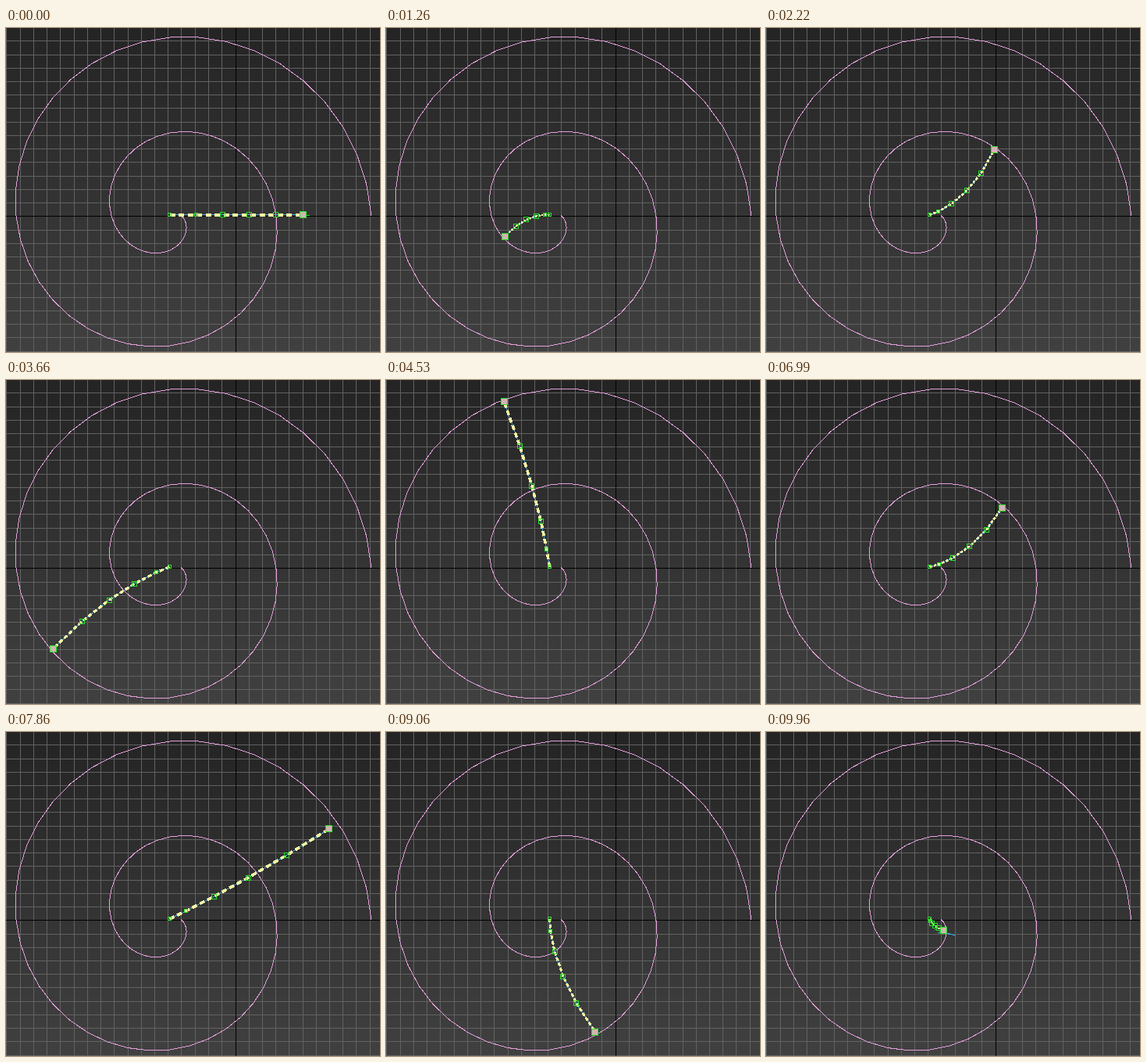
Animation, 479 px wide and 414 px high, one loop 9990 ms. Source, as an HTML page:

```html
<!DOCTYPE html>
<html lang="en">
<head>
<meta charset="utf-8">
<title>Bone chain on a spiral</title>
<style>
html, body { margin: 0; width: 100%; height: 100%; overflow: hidden; background: #303030; }
svg { display: block; width: 100vw; height: 100vh; }
</style>
</head>
<body>
<svg viewBox="0 0 479 414" shape-rendering="crispEdges" fill="none">
  <defs>
    <linearGradient id="shade" x2="0" y2="1">
      <stop stop-color="#242424"/><stop offset="1" stop-color="#404040"/>
    </linearGradient>
  </defs>
  <rect width="479" height="414" fill="url(#shade)"/>
  <path id="grid" stroke="#626262"/>
  <path d="M0 240.5H479M294.5 0V414" stroke="#000"/>
  <path id="spiral" stroke="#e69fdc" transform="translate(.4 .6)"/>
  <g id="chain"></g>
</svg>
<script>
const LOOP = 9990, CX = 209.5, CY = 238.9, CELL = 17.23, BONES = 5;
const $ = id => document.getElementById(id);
const clamp = (v, lo, hi) => Math.max(lo, Math.min(hi, v));
const polar = (r, deg) => {
  const a = deg * Math.PI / 180;
  return [CX + r * Math.cos(a), CY + r * Math.sin(a)];
};
const radius = deg => 14 + 122 * deg / 360;

let grid = '';
for (let k = -17; k < 12; k++) {
  if (!k) continue;
  const x = Math.round(293.38 + k * CELL) + 0.5, y = Math.round(240.28 + k * CELL) + 0.5;
  grid += `M${x} 0V414M0 ${y}H479`;
}
$('grid').setAttribute('d', grid);

const curve = [];
for (let deg = 0; deg <= 720; deg += 9) curve.push(polar(radius(deg), deg));
$('spiral').setAttribute('d', 'M' + curve.join('L'));

// Dragging by hand with pauses: [ms, degrees along the spiral]
const DRAG = [
  [360, 4], [2400, 345], [3390, 468], [3540, 468], [3660, 505],
  [3900, 505], [4860, 672], [4920, 672], [5310, 720], [5790, 720]
];
const PLAY = 6120, LAP = 1818;

function angleAt(t) {
  if (t >= 5790) return clamp(0.425 * (Math.max(0, t - PLAY) % LAP - 115), 0, 720);
  const i = DRAG.findIndex(k => k[0] > t);
  const [t0, a0] = DRAG[i - 1], [t1, a1] = DRAG[i];
  return a0 + (a1 - a0) * (t - t0) / (t1 - t0);
}

function pose(t) {
  if (t < 360) return { deg: 0, r: 170.5, lead: 0, power: 1, dash: 11.5, width: 4 };
  const deg = angleAt(t);
  // the handle cuts a corner near the end of the spiral
  const r = radius(deg) - 3.5 - 10 * Math.exp(-(((deg - 690) / 12) ** 2));
  return {
    deg, r,
    lead: clamp(0.176 * (254 - r), 0, 28),
    power: 1.42,
    dash: Math.max(4, r * 0.046),
    width: Math.min(4, 2 + r / 130)
  };
}

function draw(t) {
  const { deg, r, lead, power, dash, width } = pose(t);
  const joints = [];
  for (let i = 0; i <= BONES; i++) {
    const u = i / BONES;
    joints.push(polar(r * u ** power, deg + lead * Math.min(1, 1.25 * (1 - u))));
  }
  const line = 'M' + joints.join('L');
  const [hx, hy] = joints[BONES];
  let out = `<path d="${line}" stroke="#4aa8d8"/>` +
    `<path d="${line}" stroke="#f6f6a4" stroke-width="${width}" stroke-dasharray="${dash * 0.63} ${dash * 0.37}"/>`;
  if (r < 30) out += `<path d="M${hx - 12} ${hy - 1}l27 8M${hx - 8} ${hy + 3}l14 2" stroke="#35a8e0"/>`;
  joints.forEach(([x, y], i) => {
    const s = 4 + 2 * Math.floor((i + 1) / 3);
    const px = Math.floor(x) + 0.5 - s / 2, py = Math.floor(y) + 0.5 - s / 2;
    const fill = i === BONES ? '#d3b3b3' : 'none';
    out += `<rect x="${px}" y="${py}" width="${s}" height="${s}" fill="${fill}" stroke="#28e028"/>`;
  });
  if (t < 360) out += '<path d="M385 239.5h4" stroke="#28e028"/>';
  $('chain').innerHTML = out;
}

const start = performance.now();
function tick() {
  const t = (performance.now() - start) % LOOP;
  draw(Math.floor(t / 30) * 30);
  requestAnimationFrame(tick);
}
tick();
</script>
</body>
</html>
```
